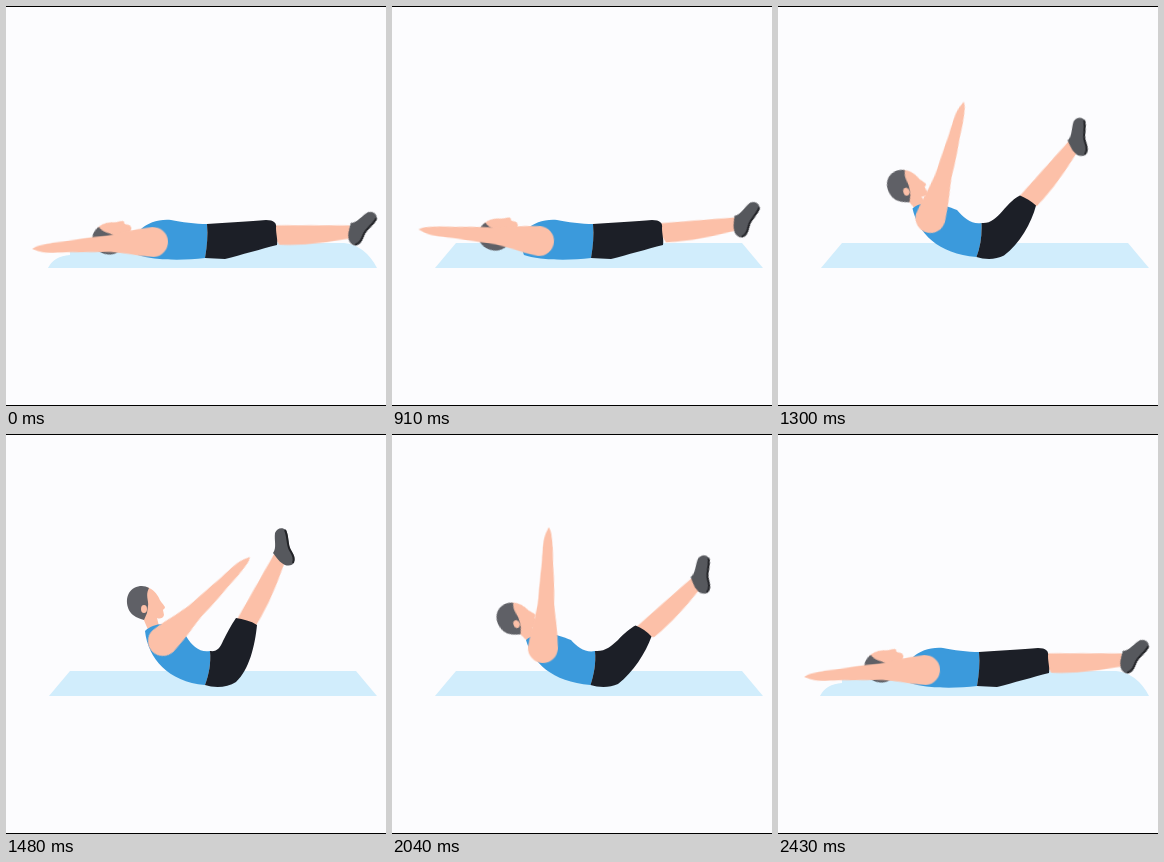
Write an HTML page without scripts that moves like this. It is 380 px wide and 400 px high and loops after 2470 ms.

```html
<!DOCTYPE html>
<html lang="en">
<head>
<meta charset="utf-8">
<title>V-up exercise</title>
<style>
html, body { margin: 0; width: 100%; height: 100%; overflow: hidden; background: #fcfcfe; }
svg { display: block; width: 100%; height: 100%; }

.move, .morph, .mat { animation: 2470ms steps(6) infinite; }
.move { animation-name: move; }
.morph { animation-name: morph; }
.mat { animation-name: mat; animation-timing-function: step-end; fill: #d1edfc; }
.skin { fill: #fcc0a8; }
.hair { fill: #5f6066; }

/* Poses: lying, lift off, rising, up, lean back, lowering */
@keyframes move {
  0%, 98.37%, 100% { transform: var(--lie); animation-timing-function: step-end; }
  36.83% { transform: var(--lift); }
  47.36% { transform: var(--rise); }
  57.88% { transform: var(--up); animation-timing-function: step-end; }
  77.32% { transform: var(--lean); }
  87.84% { transform: var(--lower); }
}
@keyframes morph {
  0%, 36.83%, 98.37%, 100% { d: var(--lie); }
  47.36% { d: var(--rise); }
  57.88%, 77.32% { d: var(--up); }
  87.84% { d: var(--lower); }
}
@keyframes mat {
  0%, 98.37%, 100% { d: path("M42 262Q48 250 64 249L64 237L338 237Q359 239 371 262Z"); }
  15.78% { d: path("M43 262Q53 250 64 237L64 237L350 237Q360 249 371 262Z"); }
}

.head {
  --lie: translate(101px, 236px) rotate(-64deg);
  --lift: translate(101px, 232px) rotate(-62deg);
  --rise: translate(110px, 193px) rotate(-34deg);
  --up: translate(133px, 168px) rotate(0deg);
  --lean: translate(129.5px, 170px) rotate(-4deg);
  --lower: translate(105px, 201px) rotate(-40deg);
}
.arm {
  --lie: translate(147px, 236px) rotate(-183.3deg);
  --lift: translate(147px, 235px) rotate(-174.5deg);
  --rise: translate(148px, 217px) rotate(-104deg);
  --up: translate(157px, 207px) rotate(-44deg);
  --lean: translate(156px, 208px) rotate(-52deg);
  --lower: translate(146px, 220px) rotate(-122.5deg);
}
.leg {
  --lie: translate(268px, 229px) rotate(-2deg);
  --lift: translate(268px, 227px) rotate(-6.5deg);
  --rise: translate(257px, 204px) rotate(-38deg);
  --up: translate(239px, 191px) rotate(-62.5deg);
  --lean: translate(241px, 191px) rotate(-59deg);
  --lower: translate(262px, 208px) rotate(-28deg);
}
.shoe {
  --lie: translate(343px, 226px) rotate(52deg);
  --lift: translate(342px, 219px) rotate(44deg);
  --rise: translate(315px, 159px) rotate(24deg);
  --up: translate(273px, 126px) rotate(0deg);
  --lean: translate(278px, 129px) rotate(4deg);
  --lower: translate(327px, 174px) rotate(28deg);
}
.shirt {
  fill: #3b9adc;
  --lie: path("M201 218C190 218 175 216 165 214C152 213 142 217 135 223C130 230 128 240 132 249C145 254 175 255 199 252C201 240 202 230 201 218Z");
  --rise: path("M203 217C195 219 185 212 178 206C170 202 160 201 148 202C140 203 134 205 130 208C138 230 158 248 198 251C202 240 203 230 203 217Z");
  --up: path("M204 217C194 219 186 212 180 202C174 200 164 195 157 190C150 190 143 193 139 197C142 224 162 248 199 251C203 240 205 230 204 217Z");
  --lower: path("M202 217C193 219 184 214 178 210C170 206 160 205 150 206C142 208 134 211 129 215C138 232 158 248 198 251C201 240 203 230 202 217Z");
}
.shorts {
  fill: #1c1f27;
  --lie: path("M201 218C220 217 245 215 260 214C268 214 271 217 270 222C270 228 272 234 271 239C255 243 235 249 219 253C212 253 205 252 199 252C201 240 202 230 201 218Z");
  --rise: path("M203 217C213 218 222 210 232 203C241 196 249 192 254 195C258 199 262 203 265 208C258 222 240 240 222 251C214 254 205 253 198 251C202 240 203 230 203 217Z");
  --up: path("M204 217C211 218 214 214 217 207C221 199 225 191 230 184C237 185 245 187 251 191C249 212 243 236 230 248C221 254 208 254 199 251C203 240 205 230 204 217Z");
  --lower: path("M202 217C214 218 225 210 235 205C243 200 252 197 257 199C262 203 265 208 268 214C258 226 240 240 222 252C214 254 205 253 198 251C201 240 203 230 202 217Z");
}
</style>
</head>
<body>
<svg viewBox="0 0 380 400">
  <path d="M0 .5H380M0 399.5H380" stroke="#000"/>
  <path class="mat"/>
  <g class="move head">
    <path class="skin" d="M8 -15C14 -13 18 -8 20 -4C21 -1 25 3 26 5C26 7 24 7 24 8L25 13C24 17 20 17 18 16L20 24L10 30L4 16L-2 0Z"/>
    <path class="hair" d="M10 -14C4 -18 -6 -16 -10 -9C-14 -2 -12 8 -6 13C-2 16 2 17 5 18L8 11L9 4C10 -2 6 -6 10 -14Z"/>
    <ellipse class="skin" cx="5" cy="7" rx="3" ry="4"/>
  </g>
  <path class="move leg skin" d="M-6 -10C20 -9 50 -8 76 -7L77 6C55 8 40 12 5 10Z"/>
  <g class="move shoe">
    <path fill="#56585d" d="M-6 -7C-2 -12 -5 -20 -4 -27C-2 -32 3 -33 7 -30C10 -24 9 -16 11 -11C14 -6 17 -3 15 2C14 6 9 6 6 5C1 3 -3 -3 -6 -7Z"/>
    <path fill="none" stroke="#222327" stroke-width="2" d="M6 -30C9 -24 8 -16 10.500 -11C13 -6 16 -3 14 3"/>
  </g>
  <path class="morph shirt"/>
  <path class="morph shorts"/>
  <path class="move arm skin" d="M0 -15C20 -13 30 -8 50 -7C75 -6 90 -5 100 -5C110 -5 117 -2 121 0C117 3 108 4 100 5C80 6 60 9 45 9C25 12 15 14 0 15A15 15 0 0 1 0 -15Z"/>
</svg>
</body>
</html>
```
